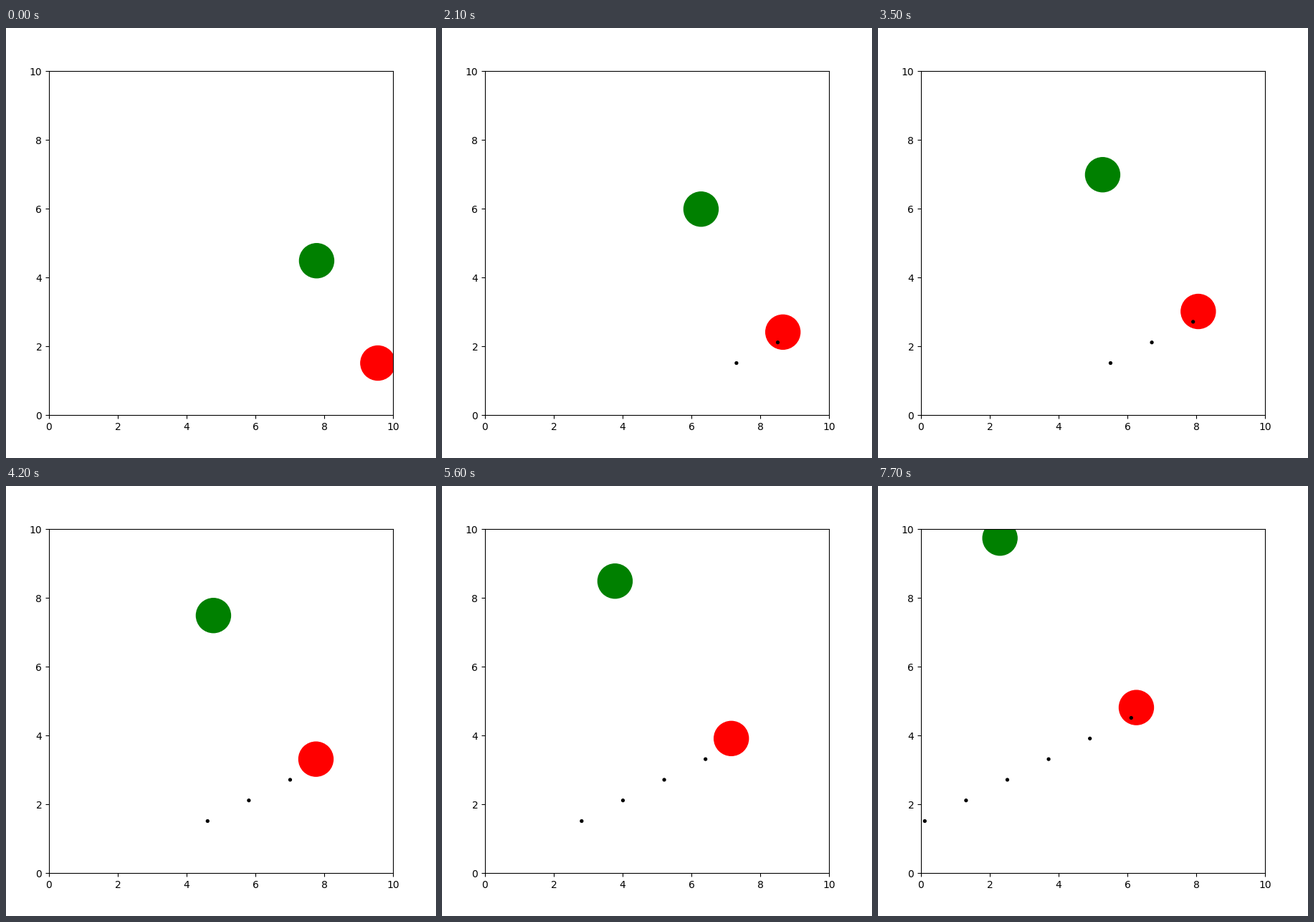
Recreate the animation shown at these times as a matplotlib script. Size 600 px wide and 600 px high, loop 8000 ms.

```python
import matplotlib.pyplot as plt
from matplotlib.animation import FuncAnimation
from matplotlib.patches import Circle

TICK = 50            # ms per drawn frame
FRAMES = 160
HOLD = 7             # drawn frames per simulation step
RELOAD = 4           # steps between shots
SHOTS = 6
SHOT_SPEED = 0.45

fig = plt.figure(figsize=(6, 6), dpi=100)
ax = fig.add_axes([0.1, 0.1, 0.8, 0.8])
ax.set_xlim(0, 10)
ax.set_ylim(0, 10)


def add_ball(radius, color):
    return ax.add_patch(Circle((0, 0), radius, color=color))


def red_pos(step):
    return 9.56 - 0.15 * step, 1.51 + 0.15 * step


def green_pos(step):
    # the ball climbs diagonally, then slides along the top wall
    rise = min(step, 21)
    slide = step - rise
    return 7.78 - 0.25 * rise - 0.235 * slide, 4.485 + 0.25 * rise


green = add_ball(0.5, "green")
red = add_ball(0.5, "red")
shots = [add_ball(0.04, "black") for _ in range(SHOTS)]


def update(i):
    step = i // HOLD
    green.center = green_pos(step)
    red.center = red_pos(step)
    for n, shot in enumerate(shots):
        fired = n * RELOAD
        age = step - fired - 1
        x, y = red_pos(fired)
        shot.center = x - SHOT_SPEED * age, y
        shot.set_visible(age >= 0)
    return [green, red, *shots]


anim = FuncAnimation(fig, update, frames=FRAMES, interval=TICK,
                     repeat=True, repeat_delay=0, blit=False)
plt.show()
```
